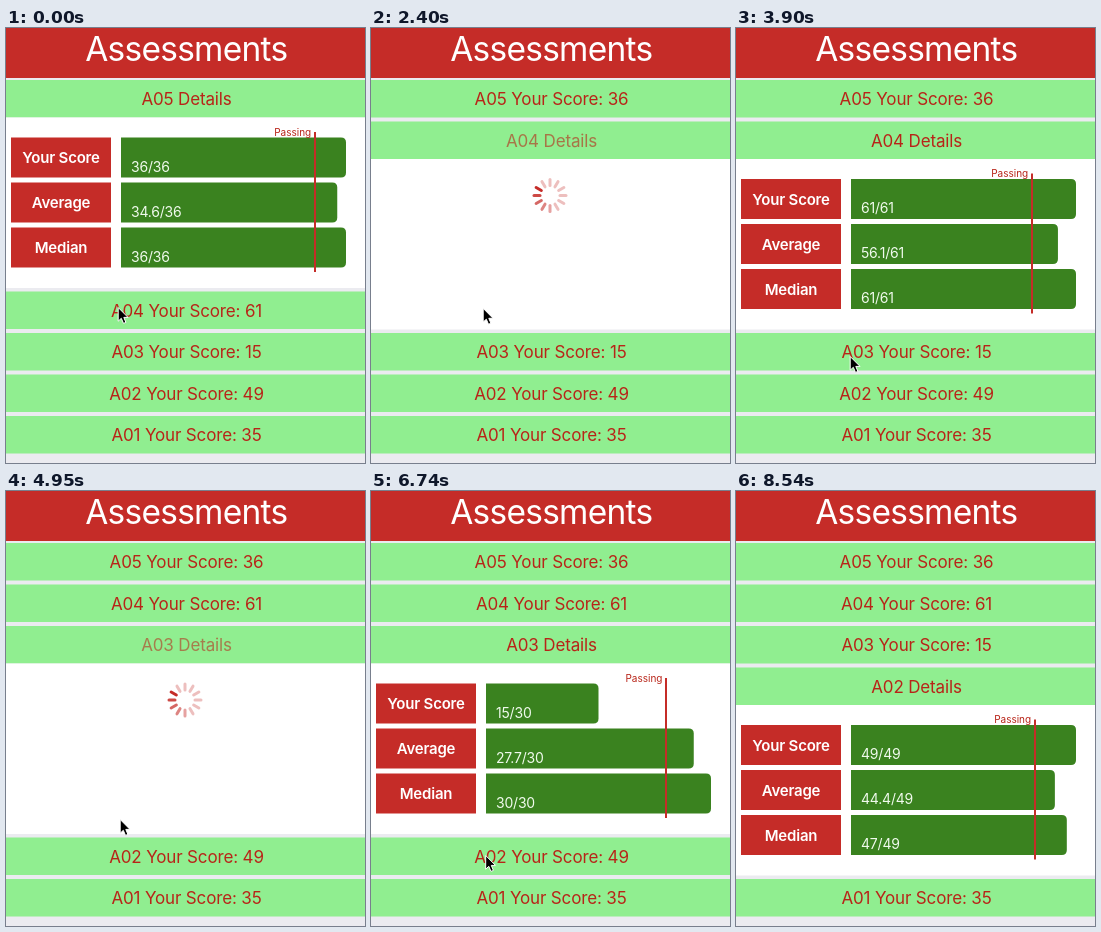
These frames come from a looping animation (359 by 435 pixels, 9140 ms). An HTML page:

```html
<!DOCTYPE html>
<html lang="en">
<head>
<meta charset="utf-8">
<title>Assessments</title>
<style>
  html, body { margin: 0; width: 100%; height: 100%; overflow: hidden; background: #ebebf0; }
  svg { display: block; width: 359px; height: 435px; font-family: Inter, Roboto, sans-serif; }
  text { white-space: pre; }
  .title { font-size: 33.5px; letter-spacing: -.75px; fill: #fff; text-anchor: middle; }
  .row { font-size: 17px; letter-spacing: -.15px; fill: #b82418; text-anchor: middle; }
  .label { font-size: 15px; font-weight: 600; letter-spacing: -.2px; fill: #fff; text-anchor: middle; }
  .value { font-size: 14px; letter-spacing: -.2px; fill: #f0faed; }
  .passing { font-size: 10px; fill: #b82418; text-anchor: end; }
  .red { fill: #c52c28; }
  .green { fill: #90ee90; }
  .bar { fill: #3a821f; }
  .spoke { stroke: #c52c28; stroke-width: 3; stroke-linecap: round; }
</style>
</head>
<body>
<svg id="stage" viewBox="0 0 359 435"></svg>
<script>
const LOOP = 9140, FULL = 225, BAR_X = 115;
const ROW_TOP = 52, ROW_H = 37.5, STRIDE = 41.5, PANEL_H = 170.5;

// scores: own, average, median
const tests = [
  { name: 'A05', scores: [36, 34.6, 36], max: 36, pass: 31 },
  { name: 'A04', scores: [61, 56.1, 61], max: 61, pass: 49 },
  { name: 'A03', scores: [15, 27.7, 30], max: 30, pass: 24 },
  { name: 'A02', scores: [49, 44.4, 47], max: 49, pass: 40 },
  { name: 'A01', scores: [35], max: 35, pass: 28 }
];
const taps = [
  { row: 1, at: 2250, grow: 2455, fade: [.3, .6] },
  { row: 2, at: 4800, grow: 5010, fade: [.3, .56] },
  { row: 3, at: 7490, grow: 7610, fade: [.3, .7] }
];
// time, x, y
const pointer = [
  [0, 111, 278], [2700, 111, 279], [3000, 111, 281], [3150, 111, 286],
  [3900, 113, 327], [6150, 113, 327], [6740, 113.5, 363],
  [8090, 113.5, 363], [8390, 181, 415]
];

const stage = document.getElementById('stage');

function add(parent, tag, attrs = {}, content = '') {
  const el = document.createElementNS('http://www.w3.org/2000/svg', tag);
  set(el, attrs);
  el.textContent = content;
  return parent.appendChild(el);
}
function set(el, attrs) {
  for (const key in attrs) el.setAttribute(key, attrs[key]);
}
const move = (el, x, y) => set(el, { transform: `translate(${x} ${y})` });
const show = (el, on) => set(el, { visibility: on ? 'visible' : 'hidden' });

add(stage, 'rect', { class: 'red', width: 359, height: 50 });
add(stage, 'text', { class: 'title', x: 180.3, y: 33 }, 'Assessments');

const rows = tests.map(() => {
  const g = add(stage, 'g');
  add(g, 'rect', { class: 'green', width: 359, height: ROW_H });
  return { g, text: add(g, 'text', { class: 'row', x: 180.5, y: 25.2 }) };
});

const panel = add(stage, 'g');
add(panel, 'rect', { width: 359, height: PANEL_H, fill: '#fff' });

const spinner = add(panel, 'g', { transform: 'translate(179 36.5)' });
for (let i = 0; i < 12; i++) {
  const age = (22 - i) % 12;
  add(spinner, 'line', {
    class: 'spoke', y1: -10, y2: -16, transform: `rotate(${i * 30})`,
    'stroke-opacity': Math.max(.3, 1 - age * .14)
  });
}

const chart = add(panel, 'g');
const bars = ['Your Score', 'Average', 'Median'].map((label, i) => {
  const y = 20 + i * 45;
  add(chart, 'rect', { class: 'red', x: 5, y, width: 100, height: 40 });
  add(chart, 'text', { class: 'label', x: 55, y: y + 25.5 }, label);
  return {
    y,
    shape: add(chart, 'path', { class: 'bar' }),
    value: add(chart, 'text', { class: 'value', x: 125, y: y + 34 })
  };
});
const passLine = add(chart, 'rect', { class: 'red', y: 14.5, width: 2, height: 140 });
const passText = add(chart, 'text', { class: 'passing', y: 18 }, 'Passing');

const cursor = add(stage, 'path', {
  d: 'M1.2 1.5V15.2L4.3 12.3L6.5 17.4L8.9 16.4L6.8 11.4H11Z',
  stroke: '#fff', 'stroke-width': 1, 'stroke-linejoin': 'round'
});

// The picture advances in 150 ms steps, realigned once at 6740.
function step(t) {
  const base = t < 6740 ? 0 : 6740;
  return base + Math.floor((t - base) / 150) * 150;
}

function easeIn(x) {
  // cubic-bezier(.42, 0, 1, 1)
  let lo = 0, hi = 1;
  for (let i = 0; i < 20; i++) {
    const s = (lo + hi) / 2;
    const px = 1.26 * s * (1 - s) ** 2 + 3 * s * s * (1 - s) + s ** 3;
    if (px < x) lo = s; else hi = s;
  }
  return 3 * lo * lo * (1 - lo) + lo ** 3;
}
function easeInOut(x) {
  x = Math.min(1, Math.max(0, x));
  return x < .5 ? easeIn(2 * x) / 2 : 1 - easeIn(2 - 2 * x) / 2;
}

function pointerAt(t) {
  const next = pointer.findIndex(p => p[0] > t);
  if (next < 0) return pointer[pointer.length - 1].slice(1);
  const a = pointer[next - 1], b = pointer[next];
  const k = (t - a[0]) / (b[0] - a[0]);
  return [a[1] + (b[1] - a[1]) * k, a[2] + (b[2] - a[2]) * k];
}

function barPath(y, w) {
  const r = Math.min(5, w);
  return `M${BAR_X} ${y}h${w - r}q${r} 0 ${r} ${r}v${40 - 2 * r}q0 ${r} ${-r} ${r}h${r - w}z`;
}

function draw(t) {
  const tap = taps.filter(p => p.at <= t).pop();
  const opened = taps.filter(p => p.at + 150 <= t).pop();
  const open = opened ? opened.row : 0;
  const loading = !!opened && t < opened.grow;
  const grown = opened ? easeInOut((t - opened.grow) / 500) : 1;

  rows.forEach(({ g, text }, i) => {
    const test = tests[i];
    move(g, 0, ROW_TOP + i * STRIDE + (i > open ? PANEL_H - .5 : 0));
    text.textContent = test.name + (i === open ? ' Details' : ` Your Score: ${test.scores[0]}`);
    const fade = tap && tap.row === i ? tap.fade[Math.round((t - tap.at) / 150)] : 1;
    set(text, { 'fill-opacity': fade || 1 });
  });

  move(panel, 0, ROW_TOP + open * STRIDE + ROW_H);
  show(spinner, loading);
  show(chart, !loading);

  const { scores, max, pass } = tests[open];
  bars.forEach(({ y, shape, value }, i) => {
    set(shape, { d: barPath(y, Math.max(1.5, FULL * grown * scores[i] / max)) });
    value.textContent = `${scores[i]}/${max}`;
  });
  const passX = BAR_X + FULL * pass / max;
  set(passLine, { x: Math.round(passX - .6) });
  set(passText, { x: passX - 3.5 });

  show(cursor, t < 8540);
  move(cursor, ...pointerAt(t));
}

const start = performance.now();
function tick(now) {
  draw(step(Math.max(0, now - start) % LOOP));
  requestAnimationFrame(tick);
}
draw(0);
requestAnimationFrame(tick);
</script>
</body>
</html>
```
